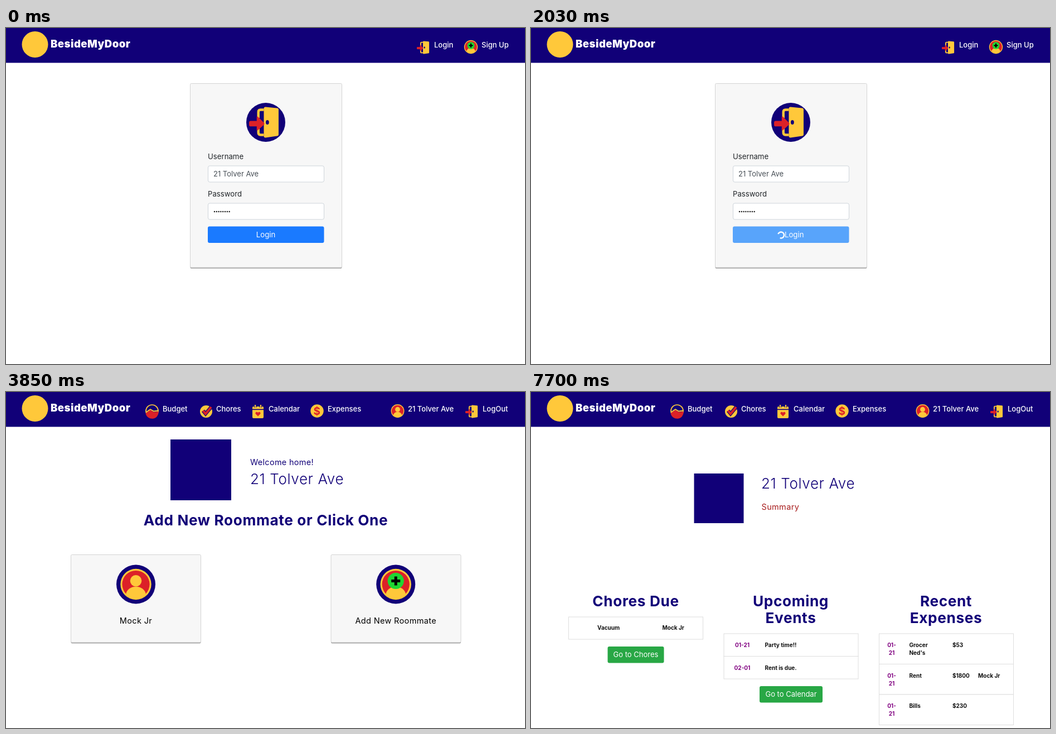
An HTML page that plays this animation: 931x602 px, repeating every 8000 ms.

```html
<!DOCTYPE html>
<html lang="en">
<head>
<meta charset="utf-8">
<title>Shared home</title>
<style>
  html, body { margin: 0; width: 100%; height: 100%; overflow: hidden; background: #fff; }
  svg { display: block; width: 100%; height: 100%; font-family: Inter, "Open Sans", sans-serif; }
  .wide { letter-spacing: .024em; }
</style>
</head>
<body>
<svg id="stage" viewBox="0 0 931 602" xmlns="http://www.w3.org/2000/svg"></svg>
<script>
const NAVY = '#110078', GOLD = '#ffc83a', RED = '#dc2128', GREEN = '#28a745';
const HOME = '21 Tolver Ave', MATE = 'Mock Jr';
const LOOP = 8000, STEP = 70;
const AT = { submit: 1750, home: 2100, mates: 2170, nav: 3710, summary: 7070, data: 7140 };

// Markup helpers
const group = (id, body) => `<g id="${id}">${body}</g>`;
const place = (x, y, k, body) => `<g transform="translate(${x} ${y}) scale(${k})">${body}</g>`;
const rect = (x, y, w, h, fill, more = '') =>
  `<rect x="${x}" y="${y}" width="${w}" height="${h}" fill="${fill}" ${more}/>`;
const disc = (x, y, r, fill, more = '') =>
  `<circle cx="${x}" cy="${y}" r="${r}" fill="${fill}" ${more}/>`;
const path = (d, fill, more = '') => `<path d="${d}" fill="${fill}" ${more}/>`;
const text = (s, x, y, size, fill, weight = 400, anchor = 'start') =>
  `<text x="${x}" y="${y}" font-size="${size}" fill="${fill}" font-weight="${weight}" ` +
  `text-anchor="${anchor}" class="${size > 14 ? 'wide' : ''}">${s}</text>`;
const title = (s, x, y) => text(s, x, y, 26.2, NAVY, 700, 'middle');
const small = (s, x, y, fill = '#111', anchor) => text(s, x, y, 10, fill, 700, anchor);

// Icons, centred on the origin
const door = (x, y, k) => place(x, y, k,
  path('M0-23h-6q-4 0-4 4v11M-10 9v10q0 4 4 4h6', 'none', `stroke="${GOLD}" stroke-width="4.5"`) +
  path('M0-25Q0-28 3-28L24-26Q27-26 27-23V22Q27 25 24 25L3 28Q0 28 0 25Z', GOLD) +
  `<ellipse cx="6.5" cy="0" rx="3" ry="4" fill="${NAVY}"/>` +
  path('M-24-2.5h11v-7q0-2 2-1l11 11q2 2 0 4l-11 10q-2 1-2-1v-6h-11q-3 0-3-3v-4q0-3 3-3z', RED));

const person = (x, y, k, plus) => place(x, y, k,
  disc(0, 0, 35, NAVY) + disc(0, 0, 27.7, GOLD) + disc(0, 0, 24.6, RED) +
  path('M-18 18C-15-.5 15-.5 18 18Q10 26 0 26T-18 18Z', GOLD) +
  (plus
    ? disc(0, -6, 14.6, '#1fd632') + path('M-8-6H8M0-14V2', 'none', 'stroke="#000" stroke-width="5"')
    : disc(0, -6.3, 10.3, GOLD)));

const budget = (x, y) => place(x, y, 1,
  disc(0, 0, 11, NAVY, `stroke="${GOLD}" stroke-width="1.7"`) +
  path('M-11.5 4L-3-2 3 2 11.5 1A11.6 11.6 0 0 1-11.5 4Z', RED) +
  path('M-11 2.5L-3-3 3 .5 11-.5', 'none', `stroke="${GOLD}" stroke-width="1.8"`));

const TICK = 'M-5.5-1.5L-1 4 9-8';
const tick = (x, y) => place(x, y, 1, disc(0, 0, 11, GOLD) +
  path(TICK, 'none', `stroke="${NAVY}" stroke-width="6.5"`) +
  path(TICK, 'none', `stroke="${RED}" stroke-width="4"`));

const calendar = (x, y) => place(x, y, 1,
  rect(-10, -9, 20, 21, GOLD, 'rx="2"') +
  rect(-10, -4.5, 20, 1.6, NAVY) +
  path('M-5-12v5M5-12v5', 'none', `stroke="${NAVY}" stroke-width="4"`) +
  path('M-5-12v5M5-12v5', 'none', `stroke="${GOLD}" stroke-width="2"`) +
  path('M0 8.5L-4 4.5C-6 1.5-2-1 0 2 2-1 6 1.5 4 4.5Z', RED));

const coin = (x, y) => disc(x, y, 11.7, GOLD) + text('$', x, y + 7, 19, RED, 700, 'middle');

// Page parts
const card = (x, y, w, h) =>
  rect(x, y + 1.5, w, h, '#aaa', 'rx="2"') +
  rect(x, y, w, h - .5, '#f7f7f7', 'rx="2" stroke="#d4d4d4"');
const field = y => rect(362.5, y, 208, 29, '#fff', 'rx="3" stroke="#ced4da"');
const navText = (s, x) => text(s, x, 35, 13, '#fff', 500);
const button = (s, cx, y, w) =>
  rect(cx - w / 2, y, w, 29.5, GREEN, 'rx="3"') +
  text(s, cx, y + 18.8, 13, '#fff', 400, 'middle');
const row = (x, y, h) => rect(x, y, 241, h, '#fff', 'stroke="#dedede"');
const dash = (s, x, y) => small(s, x, y, '#800080', 'middle');

const header =
  rect(0, 0, 931, 62.4, NAVY) +
  disc(52, 29.5, 23.5, GOLD) +
  text('BesideMyDoor', 80, 35, 18.6, '#fff', 900) +
  group('guest', door(748, 35, .41) + navText('Login', 768) +
    person(834, 34, .44, true) + navText('Sign Up', 853)) +
  group('member', budget(262, 34) + navText('Budget', 281) +
    tick(359, 35) + navText('Chores', 377) +
    calendar(452, 35) + navText('Calendar', 471) +
    coin(558, 34) + navText('Expenses', 577) +
    person(702.5, 34, .43) + navText(HOME, 721) +
    door(835, 35, .41) + navText('LogOut', 855));

const dots = Array.from({ length: 8 }, (_, i) => disc(374 + i * 3.8, 329, 1.25, '#222')).join('');
const login =
  card(330.5, 99.5, 272, 330) +
  disc(466, 169, 35, NAVY) + door(462.5, 169, .98) +
  text('Username', 362, 235, 13.2, '#212529') + field(247) +
  text(HOME, 372, 266, 13, '#495057') +
  text('Password', 362, 302, 13.2, '#212529') + field(314) + dots +
  group('ready', rect(362, 355.5, 208.5, 29.5, '#1a7aff', 'rx="3"') +
    text('Login', 466, 375, 13.2, '#fff', 400, 'middle')) +
  group('busy', rect(362, 355.5, 208.5, 29.5, '#58a4fb', 'rx="3"') +
    place(448.5, 371, 1, path('M3.9-3.9A5.5 5.5 0 1 0 3.9 3.9', 'none',
      'id="spin" stroke="#fff" stroke-width="2.4"')) +
    text('Login', 455, 375, 13.2, '#fff'));

const addCard = card(350, 291.5, 233, 157.5) + person(466.2, 344.5, 1, true) +
  text('Add New Roommate', 466.2, 415, 14.5, '#000', 400, 'middle');
const home =
  rect(295, 85, 109, 109, NAVY) +
  text('Welcome home!', 438, 131, 14.4, NAVY) +
  text(HOME, 438, 164.5, 26, NAVY, 300) +
  title('Add New Roommate or Click One', 466, 239) +
  group('mate', card(116.5, 291.5, 233, 157.5) + person(233, 344.5, 1) +
    text(MATE, 233, 415, 14.5, '#000', 400, 'middle')) +
  group('add', addCard);

const expense = (y, name, more, price, who = '') =>
  row(624.5, y, 54.5) + dash('01-', 647, y + 24) + dash('21', 647, y + 38) +
  small(name, 678.5, y + 24) + small(more, 678.5, y + 38) +
  small(price, 756, y + 24) + small(who, 802, y + 24);
const event = (y, day, name) =>
  row(346, y, 40.5) + dash(day, 379, y + 24) + small(name, 419.5, y + 24);

const summary =
  rect(292.5, 146, 89, 89, NAVY) +
  text(HOME, 413, 172.5, 26, NAVY, 300) +
  text('Summary', 413.5, 210.5, 14.5, '#a81c1c') +
  title('Chores Due', 188, 384) +
  title('Upcoming', 466, 384) + title('Events', 466, 414) +
  title('Recent', 744.5, 384) + title('Expenses', 744.5, 414) +
  group('empty', button('Go to Chores', 188, 415.5, 101) +
    button('Go to Calendar', 466.5, 446, 113) +
    button('Go to Budget', 745, 446, 104) +
    title('Roommate Contact List', 466, 555)) +
  group('lists', row(67.5, 403, 40) +
    small('Vacuum', 119, 426) + small(MATE, 235.5, 426) +
    button('Go to Chores', 188, 456, 101) +
    event(433, '01-21', 'Party time!!') + event(473.5, '02-01', 'Rent is due.') +
    button('Go to Calendar', 466.5, 527, 113) +
    expense(433, 'Grocer', 'Ned\'s', '$53') +
    expense(487.5, 'Rent', '', '$1800', MATE) +
    expense(542, 'Bills', '', '$230'));

const stage = document.getElementById('stage');
stage.innerHTML = rect(0, 0, 931, 602, '#fff') +
  group('login', login) + group('home', home) + group('summary', summary) + header +
  group('bar', rect(927.5, 3, 2, 59, '#b9b6cf')) +
  group('track', rect(927.5, 62, 2, 540, '#cfcfcf')) +
  group('status', rect(0, 600.5, 305, 1.5, '#e9e9e9', 'rx="1"'));

const el = {};
stage.querySelectorAll('[id]').forEach(n => el[n.id] = n);
const show = (id, on) => el[id].setAttribute('visibility', on ? 'inherit' : 'hidden');
const within = (t, from, span) => t >= from && t < from + span;

// Scrollbar stays a moment, then fades out in steps
const barFade = (t, from) =>
  t < from ? 0 : Math.max(0, Math.min(1, 1 - (Math.floor((t - from) / STEP) - 3) / 5));

function draw(t) {
  const onHome = t >= AT.home && t < AT.summary;
  show('login', t < AT.home);
  show('ready', t < AT.submit);
  show('busy', t >= AT.submit);
  show('home', onHome);
  show('mate', t >= AT.mates);
  show('summary', t >= AT.summary);
  show('empty', t < AT.data);
  show('lists', t >= AT.data);
  show('guest', t < AT.nav);
  show('member', t >= AT.nav);
  show('status', within(t, AT.home, 140) || within(t, AT.summary, 140));
  show('track', within(t, AT.home, 140) || within(t, AT.data, 140));
  el.bar.setAttribute('opacity', t < AT.summary ? barFade(t, AT.home) : barFade(t, AT.data));
  el.add.setAttribute('transform', `translate(${t < AT.mates ? 0 : 233} 0)`);
  const turns = Math.floor(Math.max(0, t - AT.submit) / STEP) * STEP / 750;
  el.spin.setAttribute('transform', `rotate(${20 + turns * 360})`);
}

const start = performance.now();
function tickFrame(now) {
  draw(Math.max(0, now - start) % LOOP);
  requestAnimationFrame(tickFrame);
}
draw(0);
requestAnimationFrame(tickFrame);
</script>
</body>
</html>
```
